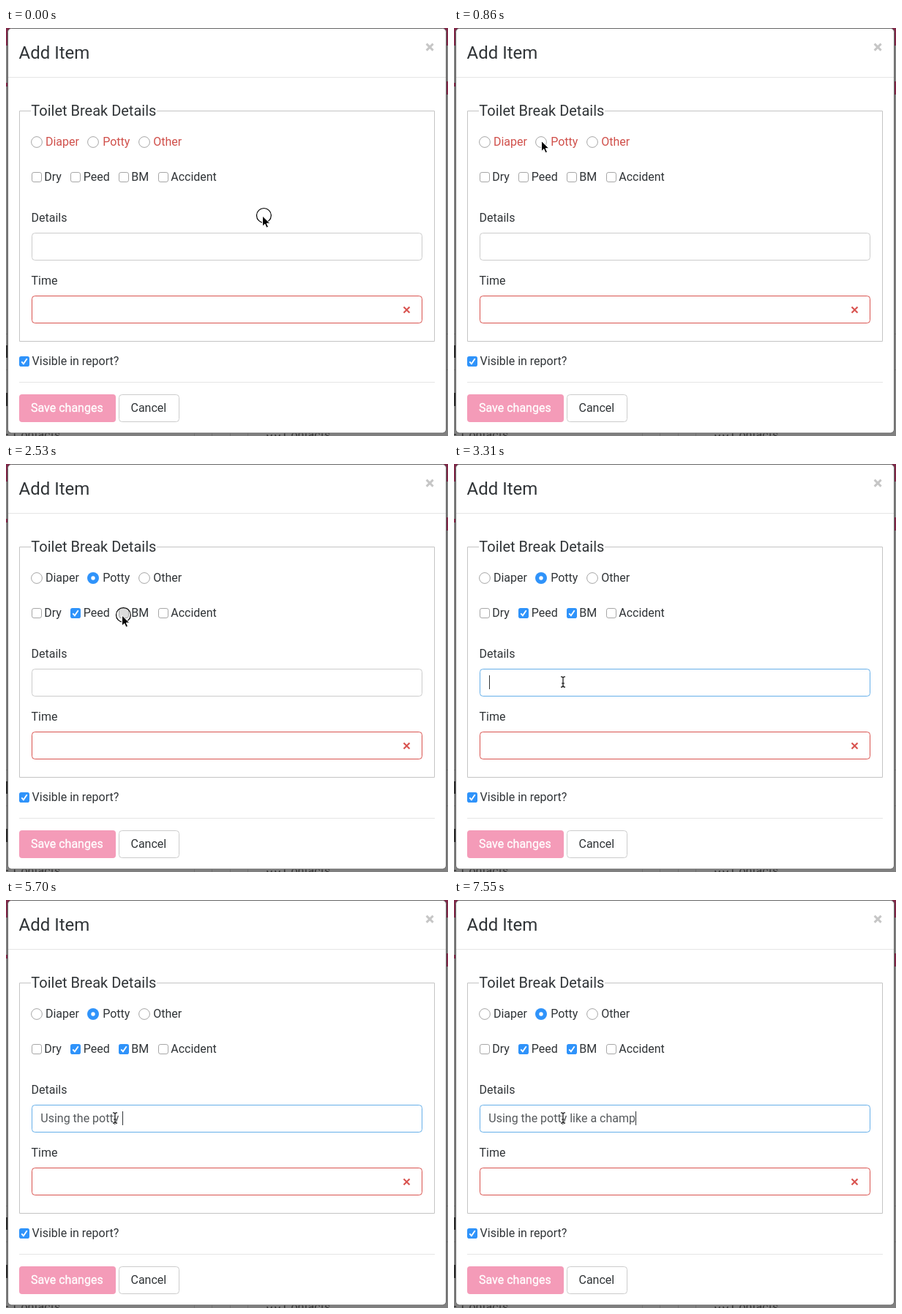
Animation of 604 by 558 pixels, one loop 8000 ms. Source, as an HTML page:

```html
<!DOCTYPE html>
<html lang="en">
<head>
<meta charset="utf-8">
<title>Add Item</title>
<style>
  html, body { margin: 0; width: 604px; height: 558px; overflow: hidden; background: #808080; }
  svg { display: block; font: 16px Roboto, sans-serif; fill: #303437; }
  .line { fill: none; stroke: #e5e5e5; }
  .field { fill: #fff; stroke: #ccc; }
  .alert { stroke: #d9534f; }
  .off { fill: #fff; stroke: #a6a6a6; }
  .press .off { fill: #dcdcdc; }
  .on { display: none; fill: #2f93fa; }
  .checked .on { display: inline; }
  .checked .off { display: none; }
  .tick { fill: none; stroke: #fff; stroke-width: 1.9; }
  .invalid .kind { fill: #d0504b; }
</style>
</head>
<body>
<svg id="stage" width="604" height="558" viewBox="0 0 604 558">
  <!-- dimmed page behind the dialog -->
  <path fill="#7f2747" d="M0 0H604V24H0zM601 73h3v18h-3zM0 75h2v5H0z"/>
  <path fill="#2b2b2b" d="M0 434h3v17H0zM0 499h3v18H0z"/>
  <path stroke="#6f6f6f" d="M0 418.5h3M0 467.5h3M601 418.5h3M601 467.5h3M257.5 554v4M281.5 554v4M306.5 554v4M330.5 554v4"/>
  <g fill="#333">
    <text x="10" y="562">Contacts</text>
    <text x="379" y="562">Contacts</text>
    <path fill="none" stroke="#333" stroke-width="1.5" d="M0 556h3M357 556a3 3 0 0 0 6 0M368 556a3 3 0 0 0 6 0"/>
  </g>

  <rect x="2.5" y=".5" width="599" height="553.5" rx="5" fill="#fff" stroke="#666"/>
  <path class="line" d="M3 67.5H601M18 484.5H586"/>
  <text x="17.5" y="42" font-size="24">Add Item</text>
  <path d="M574.6 21.6l9 9m0-9l-9 9" stroke="#c6c6c6" stroke-width="2.9"/>

  <path class="line" style="stroke:#c4c4c4" d="M34 113.5H18.5V428.5H585.5V113.5H206"/>
  <text x="34.3" y="120" font-size="20">Toilet Break Details</text>
  <g id="controls"></g>

  <text x="34.5" y="265">Details</text>
  <rect id="details" class="field" x="35.5" y="280.5" width="533" height="37" rx="4"/>
  <text id="typed" x="47.3" y="304" fill="#55595c" style="white-space:pre"></text>
  <rect id="caret" y="289" width="1" height="19"/>
  <text x="34.5" y="351">Time</text>
  <rect class="field alert" x="35.5" y="366.5" width="533" height="37" rx="4"/>
  <path class="alert" stroke-width="2.1" d="M543.5 381.5l8 8m0-8l-8 8"/>

  <rect x="18" y="501" width="132" height="38" rx="4" fill="#f49bb8"/>
  <text x="34" y="525" fill="#fff" stroke="#fff" stroke-width=".3">Save changes</text>
  <rect class="field" x="154.5" y="501.5" width="82" height="37" rx="4"/>
  <text x="170.5" y="525">Cancel</text>

  <g id="cursor">
    <circle id="ring" cx="2.4" cy="-.6" r="9.9" fill="none" stroke="#000" stroke-width="1.2"/>
    <path id="arrow" d="M.5 0V14.2L3.8 11.1 6 16.2 8.5 15.1 6.3 10.2H10.8Z" fill="#000" stroke="#fff"/>
    <g id="beam" fill="none">
      <path id="beamShape" stroke="#fff" stroke-width="2.6" d="M-3-7.2Q0-7.2 0-5V5Q0 7.2-3 7.2M3-7.2Q0-7.2 0-5V5Q0 7.2 3 7.2M-2 2H2"/>
      <path id="beamInk" stroke="#111" stroke-width="1.2"/>
    </g>
  </g>
</svg>
<script>
const $ = id => document.getElementById(id);
const LOOP = 8000, STEP = 87.5;

const radio = (id, x, label, labelX) => `<g id="${id}">
  <circle class="off" cx="${x}" cy="156" r="7.4"/>
  <g class="on"><circle cx="${x}" cy="156" r="8"/><circle cx="${x}" cy="156" r="2.7" fill="#fff"/></g>
  <text class="kind" x="${labelX}" y="161">${label}</text></g>`;

const box = (id, x, y, label, labelX) => `<g id="${id}">
  <rect class="off" x="${x + .5}" y="${y + .5}" width="13" height="13" rx="2.6"/>
  <g class="on"><rect x="${x}" y="${y}" width="14" height="14" rx="2.8"/>
  <path class="tick" d="M${x + 3.3} ${y + 7.4}l2.6 2.9 4.8-7"/></g>
  <text x="${labelX}" y="${y + 12}">${label}</text></g>`;

$('controls').innerHTML =
  radio('diaper', 42, 'Diaper', 53.9) + radio('potty', 119, 'Potty', 132.2) + radio('other', 189, 'Other', 201.2) +
  box('dry', 35, 197, 'Dry', 52.2) + box('peed', 88, 197, 'Peed', 105.8) +
  box('bm', 154, 197, 'BM', 171.3) + box('accident', 208, 197, 'Accident', 225.2) +
  box('visible', 18, 449, 'Visible in report?', 35.6);
$('visible').classList.add('checked');
$('beamInk').setAttribute('d', $('beamShape').getAttribute('d'));

// Pointer stops: step, x, y
const path = [
  [0, 350, 257], [10, 119, 154.5], [14, 119, 154.5], [20, 93, 204], [22, 93, 204],
  [24, 123, 207], [28, 158, 207], [30, 158, 207], [34, 149, 273], [36, 149, 298]
];
// Step at which each control is pressed; it is checked one step later
const presses = { potty: 12, peed: 21, bm: 29 };
const rings = [0, 12, 21, 29, 36];

const phrase = 'Using the potty like a champ';
const keyTimes = [
  3940, 4120, 4210, 4300, 4380, 4470, 4560, 4650, 4820, 4910, 5000, 5170, 5440, 5530,
  5610, 5700, 5880, 5970, 6140, 6230, 6410, 6580, 6850, 7020, 7200, 7380, 7470, 7550
];

function pointerAt(step) {
  const i = path.findIndex(p => p[0] > step);
  if (i < 0) return path[path.length - 1].slice(1);
  const [s0, x0, y0] = path[i - 1], [s1, x1, y1] = path[i];
  const u = (step - s0) / (s1 - s0), e = u * u * (3 - 2 * u);
  return [x0 + (x1 - x0) * e, y0 + (y1 - y0) * e];
}

const show = (id, on) => $(id).style.display = on ? 'inline' : 'none';

function draw(t) {
  const step = Math.floor((t + 16) / STEP);  // the screen refreshes in coarse steps
  const [x, y] = pointerAt(step);
  $('cursor').setAttribute('transform', `translate(${x} ${y})`);
  show('arrow', step < 35);
  show('beam', step >= 35);
  show('ring', rings.includes(step));

  for (const id in presses) {
    $(id).classList.toggle('press', step === presses[id]);
    $(id).classList.toggle('checked', step > presses[id]);
  }
  $('controls').classList.toggle('invalid', step <= presses.potty);

  $('details').style.stroke = step < 37 ? '#ccc' : step < 38 ? '#99bcd6' : '#66afe9';
  const typed = $('typed');
  typed.textContent = phrase.slice(0, keyTimes.filter(k => k <= t).length);
  const width = typed.textContent ? typed.getComputedTextLength() : 0;
  $('caret').setAttribute('x', Math.round(47.6 + width));
  show('caret', step >= 37 && (t < 3760 || t >= 3940));
}

function tick() {
  draw(performance.now() % LOOP);
  requestAnimationFrame(tick);
}
tick();
</script>
</body>
</html>
```
